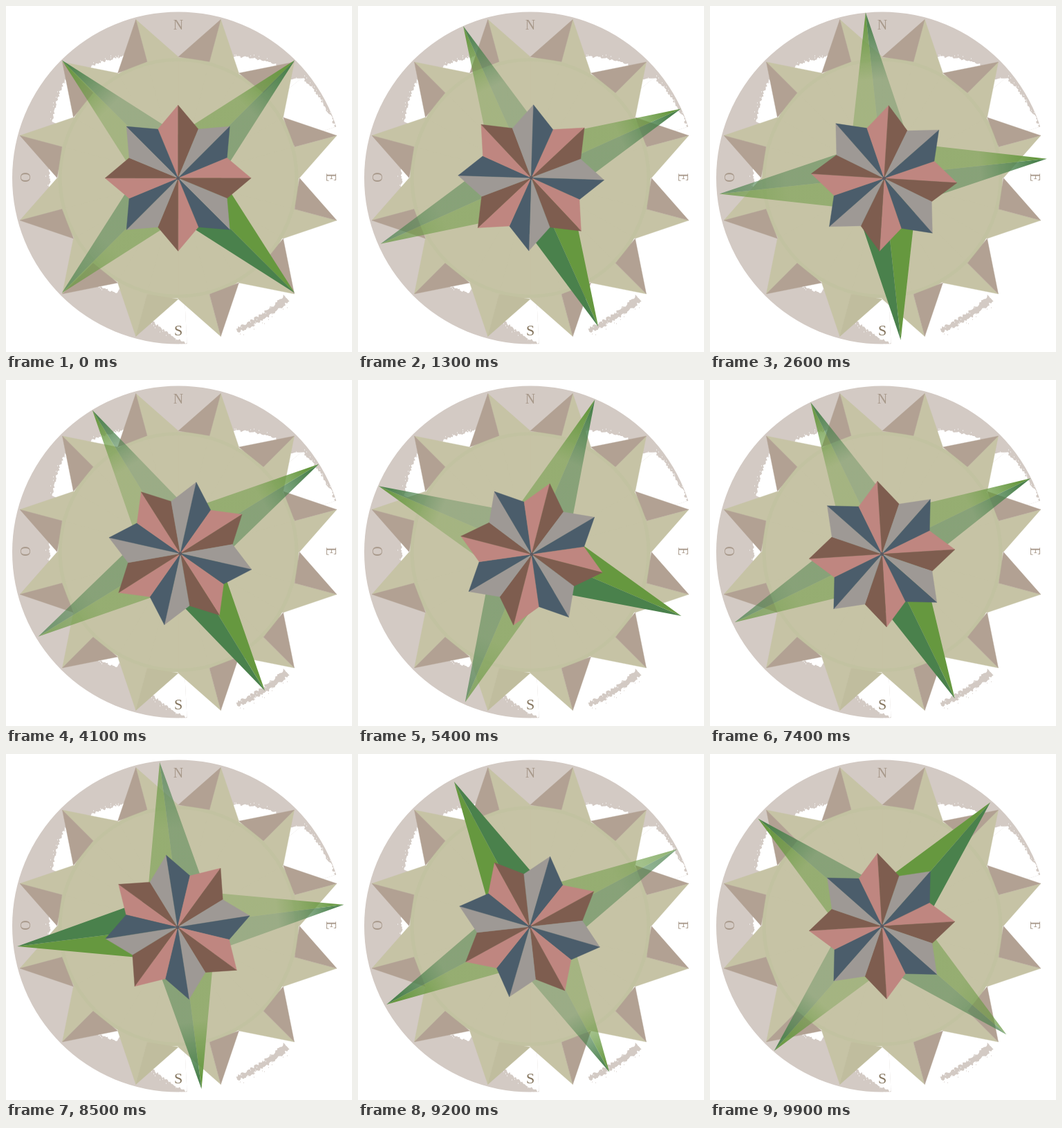
An HTML page with a canvas for the animation above (10000 ms loop, 500x500 px).

```html
<!DOCTYPE html>
<html>
<head>
<meta charset="utf-8">
<style>
html, body { margin: 0; width: 100%; height: 100%; overflow: hidden; background: #fff; }
canvas { display: block; }
</style>
</head>
<body>
<canvas id="stage" width="500" height="500"></canvas>
<script>
const STEP = 100, STEPS = 100, RAD = Math.PI / 180;
const PAPER = '#d3cac4', TAN = '#c6c3a5', BROWN = '#b2a193';
const stage = document.getElementById('stage').getContext('2d');
const backdrop = document.createElement('canvas');
backdrop.width = backdrop.height = 500;

let seed = 7;
function rand() {
  seed = (seed * 16807) % 2147483647;
  return seed / 2147483647;
}
const jitter = size => (rand() - .5) * 2 * size;
const mix = (a, b, u) => a + (b - a) * u;

// Point at a compass bearing (clockwise from north)
const polar = (deg, r) => [r * Math.sin(deg * RAD), -r * Math.cos(deg * RAD)];

function shape(g, points, fill, seam = .4) {
  g.beginPath();
  points.forEach(p => g.lineTo(...p));
  g.closePath();
  g.fillStyle = g.strokeStyle = fill;
  g.fill();
  g.lineWidth = seam;
  if (seam) g.stroke();
}

function disc(g, r, fill) {
  g.beginPath();
  g.arc(0, 0, r, 0, 7);
  g.fillStyle = fill;
  g.fill();
}

// Worn sector between two bearings, with a torn rim and loose specks
function worn(g, from, to, r0, r1, fill = '#fff') {
  const rim = [[0, 0]], specks = [];
  const count = Math.ceil((to - from) * 2);
  for (let k = 0; k <= count; k++) {
    const a = mix(from, to, k / count), r = mix(r0, r1, k / count);
    rim.push(polar(a, r + jitter(2)));
    if (rand() < .5) specks.push(polar(a, r + jitter(6)));
  }
  shape(g, rim, fill, 0);
  specks.forEach(([x, y]) => g.fillRect(Math.round(x), Math.round(y), 1, 1));
}

function letter(g, text, bearing, turn, color) {
  const [x, y] = polar(bearing, 221);
  g.save();
  g.translate(x, y - 1);
  g.rotate(turn * RAD);
  g.fillStyle = color;
  g.fillText(text, 0, 7);
  g.restore();
}

function drawBackdrop(g) {
  g.translate(249, 248.5);
  disc(g, 240, PAPER);

  worn(g, 24, 43, 192, 220);
  worn(g, 47, 51, 206, 230);
  worn(g, 51, 72, 230, 239);
  worn(g, 72, 177, 300, 300);
  worn(g, 138, 159, 239, 239, PAPER);
  worn(g, 136, 161, 228, 233);
  worn(g, 177, 193, 240, 204);
  worn(g, 208, 217, 187, 196);
  worn(g, 266, 274, 186, 186);
  worn(g, 294, 311, 200, 216);
  worn(g, 316, 336, 210, 192);

  disc(g, 174, TAN);
  for (let a = 15; a < 360; a += 30) {
    const tip = polar(a, 237), ridge = polar(a, 174);
    shape(g, [tip, polar(a + 15, 175), [0, 0], ridge], TAN);
    shape(g, [tip, polar(a - 15, 175), ridge], a === 195 ? '#c0bd9e' : BROWN);
  }
  g.beginPath();
  g.arc(0, 0, 171, 0, 7);
  g.lineWidth = 5;
  g.strokeStyle = 'rgba(184,192,152,.3)';
  g.stroke();

  g.font = '20px "Liberation Serif", serif';
  g.textAlign = 'center';
  letter(g, 'N', 0, 0, '#a8998b');
  letter(g, 'E', 90, 90, '#a8998b');
  letter(g, 'O', 270, -90, '#a8998b');
  g.font = '22px "Liberation Serif", serif';
  letter(g, 'S', 180, 0, '#85765f');
}

// Opacity at the tip and at the base of each ray, clockwise from north-east
const rays = [[1, .5], [1, 1], [.7, .5], [.95, .35]];

function drawRays(g) {
  rays.forEach(([strong, weak], i) => {
    const a = 45 + i * 90;
    [[-45, '102,152,63'], [45, '74,129,76']].forEach(([side, rgb]) => {
      const fade = g.createLinearGradient(...polar(a, 238), ...polar(a, 75));
      fade.addColorStop(.1, `rgba(${rgb},${strong})`);
      fade.addColorStop(.6, `rgba(${rgb},${weak})`);
      shape(g, [polar(a, 238), polar(a + side, 61), [0, 0]], fade, 0);
    });
  });
}

function drawRose(g) {
  for (let i = 0; i < 8; i++) {
    const a = i * 45, tip = polar(a, 105.5);
    const [light, dark] = i % 2 ? ['#9e9995', '#4b5d6b'] : ['#bf8680', '#7e5d4f'];
    shape(g, [tip, polar(a - 22.5, 76.5), [0, 0]], light);
    shape(g, [tip, polar(a + 22.5, 76.5), [0, 0]], dark);
  }
  disc(g, 2.5, '#5d5a61');
}

// Step, angle, and share of constant speed on the way there (the rest accelerates)
const keys = [[0, 0, 1], [25, 40, 1], [55, -25, .5], [71, -10.6, .5], [100, 275.9, 1]];

function rayAngle(n) {
  const i = keys.findIndex(k => n < k[0]);
  const [n0, a0] = keys[i - 1], [n1, a1, even] = keys[i];
  const u = (n - n0) / (n1 - n0);
  return mix(a0, a1, mix(u * u, u, even));
}

// Both stars sit slightly off their pivots
function spin(g, x, y, deg, draw) {
  g.save();
  g.translate(x, y);
  g.rotate(deg * RAD);
  g.translate(-1.3, -1.5);
  draw(g);
  g.restore();
}

drawBackdrop(backdrop.getContext('2d'));

function frame() {
  const n = Math.floor(performance.now() / STEP) % STEPS;
  stage.clearRect(0, 0, 500, 500);
  stage.drawImage(backdrop, 0, 0);
  spin(stage, 250.3, 248, rayAngle(n), drawRays);
  spin(stage, 250, 250.2, n * 360 / STEPS, drawRose);
  requestAnimationFrame(frame);
}
frame();
</script>
</body>
</html>
```
